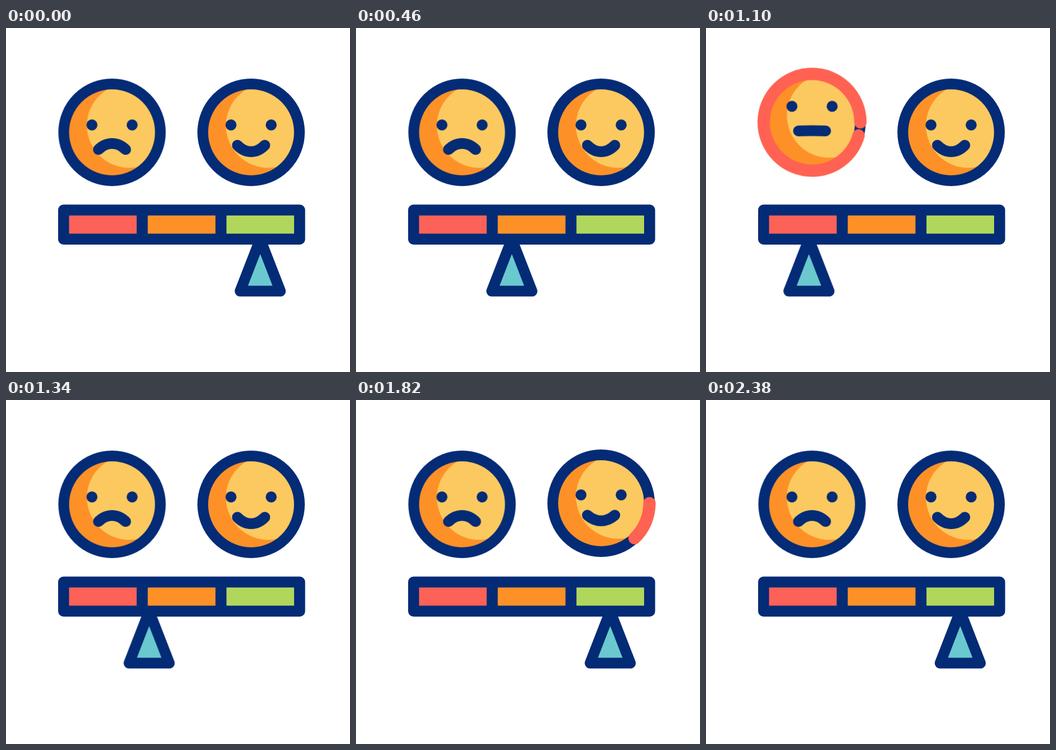
An HTML page without scripts that plays this animation: 640x640 px, repeating every 2400 ms.

```html
<!DOCTYPE html>
<html lang="en">
<head>
<meta charset="utf-8">
<title>Mood scale</title>
<style>
  :root {
    --navy: #042b76;
    --red: #ff6253;
    --orange: #fd9127;
    --yellow: #fbc95f;
    --loop: 2400ms;
    --ease: cubic-bezier(.3333, 0, .6667, 1);
  }
  html, body { margin: 0; width: 100%; height: 100%; overflow: hidden; background: #fff; }
  svg { display: block; width: 100vw; height: 100vh; }

  .line { fill: none; stroke: var(--navy); stroke-width: 20; stroke-linecap: round; stroke-linejoin: round; }
  .eye { fill: var(--navy); }
  .ring { fill: none; stroke: var(--red); stroke-width: 23; stroke-linecap: round; stroke-dasharray: 360 1080; }

  .slider, .head, .features, .ring, .mouth { animation: var(--loop) var(--ease) var(--delay, 0ms) infinite; }
  .slider { animation-name: slide; }
  .head { animation-name: lift; }
  .features { animation-name: look-up; }
  .ring { animation-name: sweep; }
  .sad { --rise: -19.6px; --look: -16.6px; }
  .happy { --rise: -15.8px; --look: -13.2px; --delay: -1362ms; }
  .sad .mouth { animation-name: unfrown; }
  .happy .mouth { animation-name: unsmile; }

  @keyframes slide {
    0%, 4.167% { transform: translateX(473px); }
    29.167%, 47.417% { transform: translateX(191.5px); }
    72.417%, 100% { transform: translateX(473px); }
  }
  @keyframes lift {
    0%, 29.167%, 55.917%, 100% { transform: translateY(0); }
    44.417% { transform: translateY(var(--rise)); }
  }
  @keyframes look-up {
    0%, 29.167%, 55.917%, 100% { transform: translateY(0); }
    44.417% { transform: translateY(var(--look)); }
  }
  /* The dash slides onto the circle, covers it, then slides off the far end. */
  @keyframes sweep {
    0%, 29.167% { stroke-dashoffset: 361; }
    44.417% { stroke-dashoffset: 0; }
    55.917%, 100% { stroke-dashoffset: -361; }
  }
  @keyframes unfrown {
    0%, 29.167%, 55.917%, 100% { d: path("M-25.3 32C-10 17 10 17 25.3 32"); }
    44.417% { d: path("M-25.3 32C-10 32 10 32 25.3 32"); }
  }
  @keyframes unsmile {
    0%, 29.167%, 55.917%, 100% { d: path("M-25.5 24C-10 40 10 40 25.5 24"); }
    44.417% { d: path("M-25.5 24C-10 24 10 24 25.5 24"); }
  }
</style>
</head>
<body>
<svg viewBox="0 0 640 640">
  <defs>
    <clipPath id="disc"><circle r="85"/></clipPath>
    <g id="base">
      <circle r="85" fill="var(--orange)"/>
      <circle cx="31.7" cy="-12.6" r="78.5" fill="var(--yellow)" clip-path="url(#disc)"/>
      <circle class="line" r="89.9"/>
    </g>
    <g id="eyes" class="eye">
      <circle cx="-37.4" cy="-13.7" r="10.2"/>
      <circle cx="37.4" cy="-13.7" r="10.2"/>
    </g>
  </defs>

  <g class="sad" transform="translate(197.3 194.1)">
    <g class="head">
      <use href="#base"/>
      <circle class="ring" r="90" pathLength="360"/>
      <g class="features">
        <use href="#eyes"/>
        <path class="line mouth" d="M-25.3 32C-10 17 10 17 25.3 32"/>
      </g>
    </g>
  </g>

  <g class="happy" transform="translate(456 194.1)">
    <g class="head">
      <use href="#base"/>
      <circle class="ring" r="90" pathLength="360"/>
      <g class="features">
        <use href="#eyes"/>
        <path class="line mouth" d="M-25.5 24C-10 40 10 40 25.5 24"/>
      </g>
    </g>
  </g>

  <rect x="97" y="328.5" width="459.5" height="74.5" rx="10" fill="var(--navy)"/>
  <rect x="117.3" y="348.8" width="125.8" height="33.8" fill="#fc6257"/>
  <rect x="263.7" y="348.8" width="126" height="33.8" fill="var(--orange)"/>
  <rect x="410.2" y="348.8" width="125.8" height="33.8" fill="#b0d75c"/>

  <g class="slider">
    <path class="line" style="fill:#6ac9ce" d="M0 393L37.5 489.6H-37.5Z"/>
  </g>
</svg>
</body>
</html>
```
